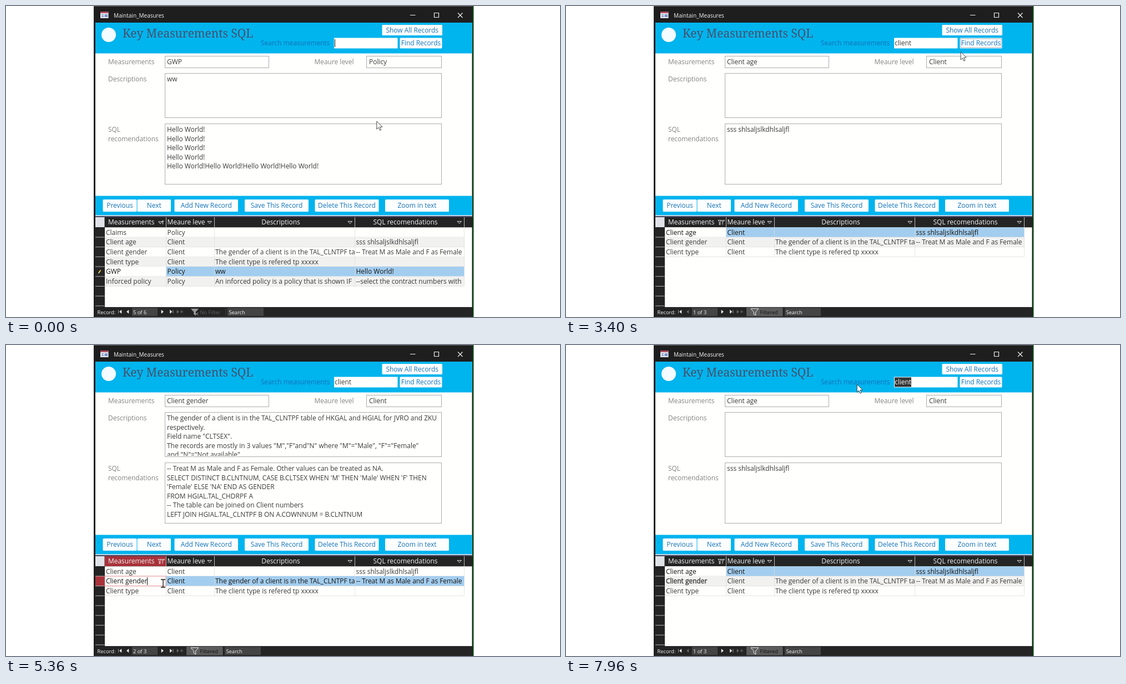
An HTML page for the animation above (8 s loop, 998 by 561 pixels).

```html
<!DOCTYPE html>
<html lang="en">
<head>
<meta charset="utf-8">
<title>Maintain_Measures</title>
<style>
html, body { margin: 0; width: 100%; height: 100%; overflow: hidden; background: #fff; }
#stage { display: block; width: 998px; height: 561px; }
text { font: 11.95px "Open Sans", sans-serif; white-space: pre; fill: #3a3a3a; }
.label { fill: #858585; }
.btn text { fill: #1474b8; }
.btn.hover rect { fill: #b3c4e6; }
.btn.hover text { fill: #34496c; }
.head { fill: #f4f4f4; }
.bold { stroke: #3a3a3a; stroke-width: .4; }
.dark { fill: #151515; }
.ui { font-size: 10px; fill: #f2f2f2; }
.nav { font-size: 9.3px; }
.title { font: 20.9px "Noto Serif", serif; fill: #46506a; }
.find { fill: #1070b8; }
.box { fill: #fffffd; stroke: #adadad; }
.icon { fill: none; stroke: #eee; }
</style>
</head>
<body>
<svg id="stage" viewBox="0 0 998 561"></svg>
<script>
const LOOP = 8000;
const FILTER = 3200, EDIT = 4880, BACK = 5880, REFOCUS = 7240;
const BLUE = '#a3cdee', RED = '#a8323a', CYAN = '#00b4ee', INK = '#242424';
const ROW_Y = 399.3, ROW_H = 17.7;
const COLS = [178, 288.5, 375.5, 628.5, 825.5];
const TEXT_X = [180, 290.5, 377, 630.5];

const rect = (x, y, w, h, fill, more = '') =>
  `<rect x="${x}" y="${y}" width="${w}" height="${h}" fill="${fill}" ${more}/>`;
const text = (x, y, s, cls = '', more = '') =>
  `<text x="${x}" y="${y}" class="${cls}" ${more}>${s}</text>`;
const path = (d, more = 'class="icon"') => `<path d="${d}" ${more}/>`;
const clip = (x, y, w, h, inner) =>
  `<svg x="${x}" y="${y}" width="${w}" height="${h}" viewBox="${x} ${y} ${w} ${h}">${inner}</svg>`;
const during = (from, to, inner) => `<g data-from="${from}" data-to="${to}">${inner}</g>`;
const lines = (x, y, list) => list.map((s, i) => text(x, y + i * 16.5, s)).join('');
const box = ([x, y, w, h]) => `<rect class="box" x="${x}" y="${y}" width="${w}" height="${h}"/>`;
const button = (x, y, w, h, s) => `<g class="btn" data-box="${x} ${y} ${w} ${h}">` +
  rect(x, y, w, h, '#fdfeff', 'rx="1.5"') +
  text(x + w / 2, y + h / 2 + 4.3, s, '', 'text-anchor="middle"') + '</g>';

const SEARCH = [591, 57.5, 114.5, 19];
const FIELDS = [[286.5, 90.5, 187, 21], [649.5, 90.5, 135, 21], [286.5, 121.5, 498, 80], [286.5, 212.5, 498, 109]];

function frame() {
  return rect(158, 0, 684, 561, '#1e1e1e') + rect(158, 0, 684, 1, '#555') +
    rect(840.5, 0, 2, 561, '#0c4a14') +
    rect(170, 10, 14.5, 12, '#e8ecf4') + rect(170, 10, 14.5, 3, '#b05060') +
    path('M172 16h4M172 19h4', 'stroke="#6a7cb0" stroke-width="1.4"') +
    rect(177.5, 15, 5.5, 5, '#7e92c8') +
    text(194, 20.5, 'Maintain_Measures', 'ui') +
    path('M728 16.5h9.5M771.5 12.5h8v8h-8zM814 12.5l8.5 8.5m0-8.5l-8.5 8.5', 'class="icon" stroke-width="1.2"');
}

function form() {
  return rect(161, 30, 678.5, 350, '#fffffd') + rect(161, 30, 678.5, 55.5, CYAN) +
    '<circle cx="185" cy="52" r="13" fill="#f4fcff"/>' +
    text(210, 57, 'Key Measurements SQL', 'title') +
    text(459, 70.5, 'Search measurements', 'find') +
    rect(...SEARCH, '#fffffd') +
    button(677.5, 34, 108.5, 19, 'Show All Records') + button(709.5, 57.5, 76, 19, 'Find Records') +
    during(2900, EDIT, rect(711, 59, 73, 16, 'none', 'stroke="#444" stroke-width=".8" stroke-dasharray="1 1"')) +
    text(184, 104.7, 'Measurements', 'label') + text(555.5, 104.7, 'Meaure level', 'label') +
    text(184, 136, 'Descriptions', 'label') + text(184, 227, 'SQL', 'label') +
    text(184, 243.5, 'recomendations', 'label') + FIELDS.map(box).join('') +
    rect(161, 342.5, 678.5, 35, CYAN) +
    [[174.5, 61, 'Previous'], [236.5, 60.5, 'Next'], [303.5, 114.5, 'Add New Record'],
     [430, 115, 'Save This Record'], [556.5, 115, 'Delete This Record'], [683, 115, 'Zoom in text']]
      .map(([x, w, s]) => button(x, 349, w, 22, s)).join('') +
    rect(161, 377.5, 678.5, 1.5, '#cfd6e4') + rect(161, 379, 678.5, 2, '#45455f');
}

function record(name, level, desc, sql) {
  return text(290, 105.2, name) + text(654, 105.2, level) +
    clip(287, 123, 497, 77, lines(290, 136.3, desc)) + lines(290, 227.3, sql);
}

const hello = 'Hello World!', scribble = 'sss shlsaljslkdhlsaljfl';
const genderDesc = 'The gender of a client is in the TAL_CLNTPF ta';
const gwp = record('GWP', 'Policy', ['ww'], [hello, hello, hello, hello, hello.repeat(4)]);
const age = record('Client age', 'Client', [], [scribble]);
const gender = record('Client gender', 'Client', [
  genderDesc + 'ble of HKGAL and HGIAL for JVRO and ZKU',
  'respectively.',
  'Field name "CLTSEX".',
  'The records are mostly in 3 values "M","F"and"N" where "M"="Male", "F"="Female"',
  'and "N"="Not available"'
], [
  '-- Treat M as Male and F as Female. Other values can be treated as NA.',
  "SELECT DISTINCT B.CLNTNUM, CASE B.CLTSEX WHEN 'M' THEN 'Male' WHEN 'F' THEN",
  "'Female' ELSE 'NA' END AS GENDER",
  'FROM HGIAL.TAL_CHDRPF A',
  '-- The table can be joined on Client numbers',
  'LEFT JOIN HGIAL.TAL_CLNTPF B ON A.COWNNUM = B.CLNTNUM'
]);

const clients = [
  ['Client age', 'Client', '', scribble],
  ['Client gender', 'Client', genderDesc, '-- Treat M as Male and F as Female'],
  ['Client type', 'Client', 'The client type is refered tp xxxxx', '']
];
const all = [
  ['Claims', 'Policy', '', ''], ...clients,
  ['GWP', 'Policy', 'ww', hello],
  ['Inforced policy', 'Policy', 'An inforced policy is a policy that is shown IF', '--select the contract numbers with']
];

// from..to: highlighted columns of the current row; red: focus is in the sheet
function sheet(data, row, { from = 1, to = 3, red = false, bold = false } = {}) {
  const y = i => ROW_Y + i * ROW_H;
  let s = rect(178, ROW_Y, 661.5, 144, '#fffffd') + rect(161, 381, 678.5, 18, INK) +
    rect(161, 381, 16.5, 18, '#dfe3e8') + rect(161, ROW_Y, 16.5, 144, INK);
  if (red) s += rect(178, 381, 110, 18, RED) + rect(161, y(row), 16.5, ROW_H, RED);
  data.forEach((cells, i) => {
    if (i % 2) s += rect(178, y(i), 647.5, ROW_H, '#f1f1f0');
    if (i === row) {
      s += rect(178, y(i), 110, ROW_H, '#fffffd') +
        rect(COLS[from], y(i), COLS[to + 1] - COLS[from], ROW_H, BLUE);
    }
    s += path(`M178 ${y(i + 1)}H825.5`, 'stroke="#dcdcdc" stroke-width=".7"');
    cells.forEach((c, k) => {
      const cls = bold && i === 1 && k === 0 ? 'bold' : i === row ? 'dark' : '';
      s += path(`M${COLS[k + 1]} ${y(i)}v${ROW_H}`, 'stroke="#dcdcdc" stroke-width=".7"') +
        clip(COLS[k], y(i), COLS[k + 1] - COLS[k], ROW_H, text(TEXT_X[k], y(i) + 13.2, c, cls));
    });
  });
  for (let i = 1; i < 9; i++) s += path(`M161 ${y(i)}h16.5`, 'stroke="#d8d8d8" stroke-width=".8"');
  if (red) s += rect(178, y(row), 110, ROW_H, 'none', 'stroke="#e59090"');
  return s + sheetHead(data === all);
}

function sheetHead(plain) {
  const tri = x => path(`M${x} 388.5h7.5l-3.7 4z`, 'class="icon" stroke-width=".9"');
  return text(184, 394.4, 'Measurements', 'head') +
    clip(289, 381, 72, 18, text(290.5, 394.4, 'Meaure leve', 'head')) +
    text(495, 394.4, 'Descriptions', 'head', 'text-anchor="middle"') +
    text(719.5, 394.4, 'SQL recomendations', 'head', 'text-anchor="middle"') +
    tri(363) + tri(616) + tri(813) +
    path(plain ? 'M274.5 389h7l-3.5 4zM282.5 394v-7l-2 2m2-2l2 2'
               : 'M274 386.5h6l-2.2 3v5h-1.6v-5zM282 394.5v-8l-2 2m2-2h3.5l-2 3', 'class="icon" stroke-width=".9"') +
    COLS.slice(1).map(x => path(`M${x} 381v18`, 'stroke="#cfcfcf" stroke-width=".9"')).join('');
}

function navBar(pos, filtered, first) {
  const arrow = (d, dim) => path(d, `fill="${dim ? '#666' : '#eee'}" stroke="${dim ? '#666' : '#eee'}" stroke-width=".6"`);
  const sx = filtered ? 394 : 399;
  return rect(161, 543.3, 678.5, 17.7, '#242424') + text(164.5, 555.5, 'Record:', 'ui nav') +
    arrow('M202.5 548.5v6M208 548.5v6l-3.5-3z') + arrow('M221 548.5v6l-3.5-3z', first) +
    rect(227, 544.5, 46, 14.5, '#444') + text(229, 555.5, pos, 'ui nav') +
    arrow('M280 548.5v6l3.5-3z') + arrow('M295.5 548.5v6l3.5-3zM301 548.5v6') +
    arrow('M308 548.5v6l3.5-3z', true) + path('M313.5 551.5h6m-3-3v6m-2-5l4 4m0-4l-4 4', 'stroke="#666" stroke-width=".7"') +
    (filtered ? rect(325, 544, 65.5, 15.5, '#5c5c5c') : '') +
    path('M333 546h14l-5.3 6v6l-3.4-2v-4z', filtered ? 'class="icon"' : 'fill="#999"') +
    (filtered ? '' : path('M340.5 553l6 5m0-5l-6 5', 'stroke="#aaa"') + rect(395.5, 545, 1, 13, '#444')) +
    text(349.5, 555.7, filtered ? 'Filtered' : 'No Filter', 'ui nav', `style="fill:${filtered ? '#111' : '#626262'}"`) +
    rect(sx, 544.5, 65, 14.5, '#444') + text(sx + 2.5, 555.5, 'Search', 'ui nav');
}

document.getElementById('stage').innerHTML = frame() + form() +
  during(0, 2600, gwp) + during(2600, EDIT, age) + during(EDIT, BACK, gender) + during(BACK, LOOP, age) +
  during(0, FILTER, sheet(all, 4) + path('M167 481.5l3.5-5', 'stroke="#f0d040" stroke-width="2"') +
    path('M166.5 482.5l1.3-1.8', 'stroke="#fff"') + navBar('5 of 6')) +
  during(FILTER, EDIT, sheet(clients, 0) + navBar('1 of 3', true, true)) +
  during(EDIT, BACK, sheet(clients, 1, { red: true }) + navBar('2 of 3', true)) +
  during(BACK, REFOCUS, sheet(clients, 0, { from: 0, to: 0, red: true, bold: true }) + navBar('1 of 3', true, true)) +
  during(REFOCUS, LOOP, sheet(clients, 0, { bold: true }) + navBar('1 of 3', true, true)) +
  `<rect id="mark" x="592" y="58.5" height="17" fill="#333"/>
  <text id="query" x="592" y="71.3"></text>
  <rect id="caret" width="1" height="14" fill="#111"/>
  <g id="pointer">
    <path id="arrow" d="M.3 0v14.2l3.3-3.1 2.3 5.2 2.3-1-2.3-5.1h4.6z" fill="#fff" stroke="#333" stroke-width=".9"/>
    <path id="beam" d="M-4-7h3q1 0 1 1v12q0 1-1 1h-3m8-14H1Q0-7 0-6m0 12q0 1 1 1h3" fill="none" stroke="#111" stroke-width="1.3"/>
    <g id="busy"><circle r="6.3" fill="#f4f9ff" stroke="#9cc8f8" stroke-width="3"/>
      <path id="spin" d="M0-6.3A6.3 6.3 0 1 1-6.3 0" fill="none" stroke="#2f7ee6" stroke-width="3"/></g>
  </g>`;

const $ = id => document.getElementById(id);
const show = (el, on) => { el.style.display = on ? '' : 'none'; };
const timed = [...document.querySelectorAll('[data-from]')];
const buttons = [...document.querySelectorAll('.btn')].slice(2);
const inside = ([x, y], [bx, by, w, h]) => x >= bx && x <= bx + w && y >= by && y <= by + h;
const editable = [SEARCH, ...FIELDS, [178, 399, 661, 144]];
const keys = [440, 600, 740, 900, 1060, 1220];

const track = [
  [0, 667.5, 208], [1320, 667.5, 208], [1640, 644.5, 205.5], [1780, 644.5, 205.5],
  [2360, 733, 63], [3280, 733, 63], [4160, 302, 448], [4400, 302, 448],
  [4760, 283, 430], [5400, 283, 430], [5740, 206, 361], [5940, 206, 361],
  [6260, 590, 358], [6320, 601.5, 343], [7120, 640, 68], [7300, 640, 68],
  [7800, 524, 71], [LOOP, 524, 71]
];
function pointerAt(t) {
  const i = Math.max(1, track.findIndex(k => k[0] > t));
  const [t0, x0, y0] = track[i - 1], [t1, x1, y1] = track[i];
  const p = Math.max(0, (t - t0) / (t1 - t0)), e = p * p * (3 - 2 * p);
  return [x0 + (x1 - x0) * e, y0 + (y1 - y0) * e];
}

function draw(now) {
  const t = now % LOOP;
  for (const g of timed) show(g, t >= +g.dataset.from && t < +g.dataset.to);

  const pos = pointerAt(t), late = pointerAt(t - 60);
  for (const b of buttons) b.classList.toggle('hover', inside(late, b.dataset.box.split(' ').map(Number)));
  const busy = t >= 2480 && t < 3240, beam = !busy && editable.some(b => inside(pos, b));
  $('pointer').setAttribute('transform', `translate(${pos})`);
  show($('busy'), busy);
  show($('beam'), beam);
  show($('arrow'), !busy && !beam);
  $('spin').setAttribute('transform', `rotate(${t * .4})`);

  const query = $('query');
  query.textContent = 'client'.slice(0, keys.filter(k => k <= t).length);
  const full = query.textContent ? query.getComputedTextLength() : 0;
  // Dragging leftwards selects from the end of the word
  const left = Math.min(full, Math.max(0, pos[0] - 592));
  const picked = t >= 7300 ? full - left : 0;
  $('mark').setAttribute('x', 592 + left);
  $('mark').setAttribute('width', picked);
  query.style.fill = picked > full / 2 ? '#fff' : '';

  const editing = t >= EDIT && t < BACK;
  const blink = Math.floor((editing ? t - EDIT : t) / 530) % 2 === 0;
  $('caret').setAttribute('x', editing ? 254 : 592 + full);
  $('caret').setAttribute('y', editing ? 419 : 60);
  show($('caret'), blink && (editing || t < 2440));
  requestAnimationFrame(draw);
}
requestAnimationFrame(draw);
</script>
</body>
</html>
```
